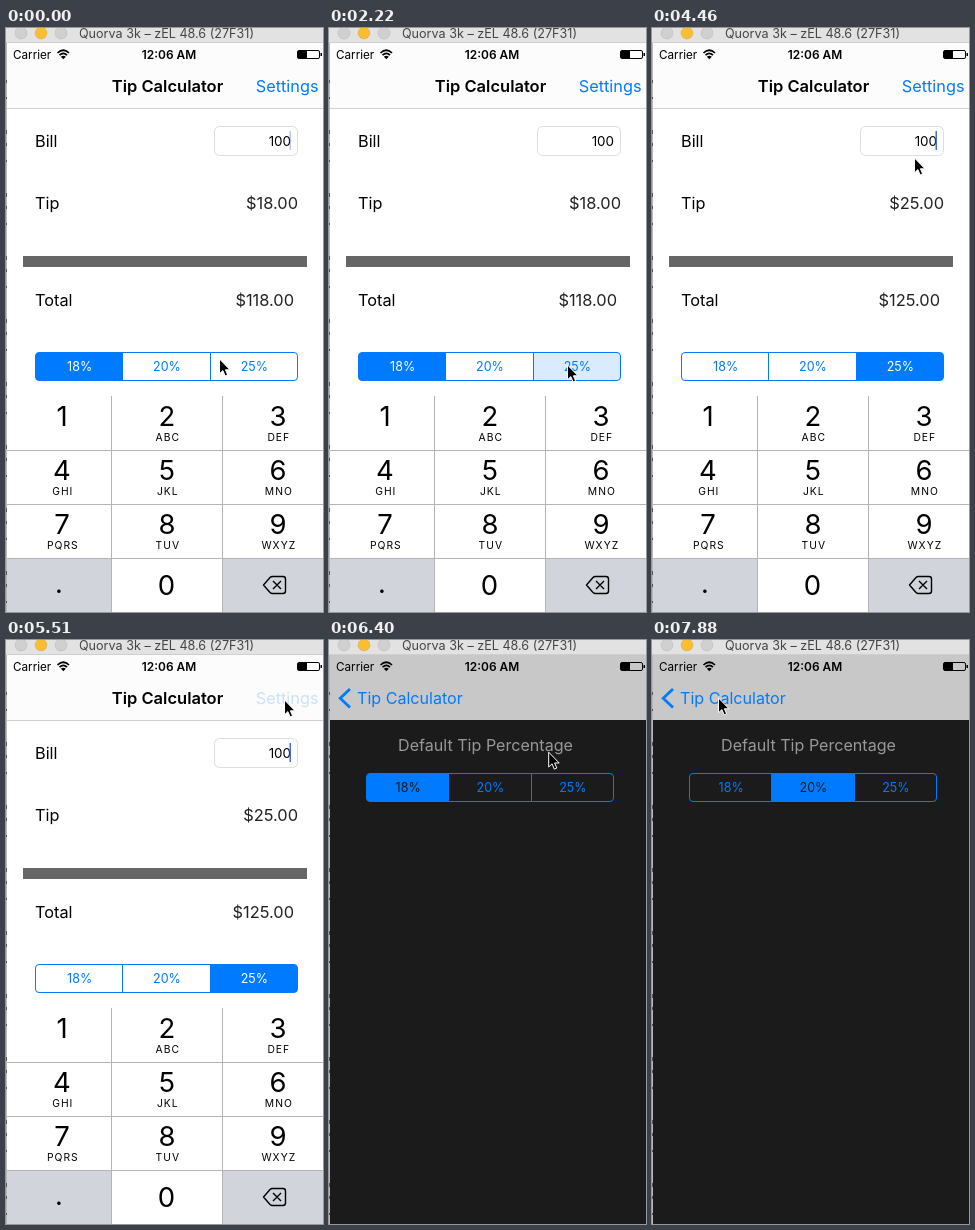
Animation of 317 by 584 pixels, one loop 8 s. Source, as an HTML page:

```html
<!DOCTYPE html>
<html lang="en">
<head>
<meta charset="utf-8">
<title>Tip calculator</title>
<style>
  html, body { margin: 0; width: 100%; height: 100%; overflow: hidden; background: #fff; }
  svg { display: block; width: 317px; height: 584px; font-family: Inter, Roboto, sans-serif; }
</style>
</head>
<body>
<svg id="stage" viewBox="0 0 317 584"></svg>
<script>
const LOOP = 8000, TICK = 148.75;
const BLUE = '#007aff', DARK = '#1b1b1b';
const stage = document.getElementById('stage');

// Pointer positions: tick, x, y
const POINTER = [
  [0, 213, 331], [2, 225, 330], [5, 304, 322], [8, 262, 334], [10, 238, 337],
  [18, 238, 337], [20, 232, 262], [21, 226, 231], [26, 226, 231], [30, 262, 130],
  [32, 285, 72], [33, 277, 61], [34, 278, 60], [40, 278, 60], [45, 180, 147],
  [46, 177, 150], [48, 177, 150], [51, 86, 61], [52, 86, 61], [53, 66, 58]
];

const clamp = v => Math.max(0, Math.min(1, v));
const rect = (x, y, w, h, fill, extra = '') =>
  `<rect x="${x}" y="${y}" width="${w}" height="${h}" fill="${fill}" ${extra}/>`;
const line = (d, stroke, width = 1, extra = '') =>
  `<path d="${d}" fill="none" stroke="${stroke}" stroke-width="${width}" ${extra}/>`;
const text = (s, x, y, size, fill = '#000', anchor = 'start', extra = '') =>
  `<text x="${x}" y="${y}" font-size="${size}" fill="${fill}" text-anchor="${anchor}" ${extra}>${s}</text>`;
const shift = (x, content) => `<g transform="translate(${x} 0)">${content}</g>`;

function pointer(tick) {
  let i = POINTER.findIndex(p => p[0] > tick);
  if (i < 0) i = POINTER.length - 1;
  const [t0, x0, y0] = POINTER[i - 1], [t1, x1, y1] = POINTER[i];
  const p = clamp((tick - t0) / (t1 - t0));
  const x = x0 + (x1 - x0) * p, y = y0 + (y1 - y0) * p;
  return `<path transform="translate(${x} ${y})" fill="#000" stroke="#fff"
    d="M.5 0V14.8L3.9 11.6L6.1 16.9L8.6 15.8L6.4 10.8H11Z"/>`;
}

// levels: how far each segment is selected, pressed: index of the touched one
function segments(id, x, y, w, levels, pressed, selectedInk) {
  const cell = w / 3;
  const shape = `x="${x}" y="${y}" width="${w}" height="28" rx="3.5"`;
  let out = `<clipPath id="${id}"><rect ${shape}/></clipPath><g clip-path="url(#${id})">`;
  levels.forEach((level, i) => {
    const alpha = i === pressed ? 0.15 : level;
    out += rect(x + i * cell, y, cell, 28, BLUE, `opacity="${alpha}"`);
  });
  out += '</g>';
  levels.forEach((level, i) => {
    const label = (ink, alpha) => text(['18%', '20%', '25%'][i], x + (i + .5) * cell + .5,
      y + 18.6, 12.5, ink, 'middle', `opacity="${alpha}"`);
    out += label(BLUE, 1 - level) + label(selectedInk, level);
  });
  const left = Math.floor(x + cell) + .5, right = Math.floor(x + 2 * cell) + .5;
  return out + line(`M${left} ${y}v28M${right} ${y}v28`, BLUE) +
    `<rect ${shape} fill="none" stroke="${BLUE}"/>`;
}

function keypad() {
  const letters = ['', 'ABC', 'DEF', 'GHI', 'JKL', 'MNO', 'PQRS', 'TUV', 'WXYZ'];
  const columns = [56, 161, 272];
  let out = rect(1, 368, 316, 216, '#fff') +
    rect(1, 530, 104, 54, '#d1d4db') + rect(217, 530, 100, 54, '#d1d4db');
  letters.forEach((s, i) => {
    const x = columns[i % 3], y = 398 + 54 * Math.floor(i / 3);
    out += text(i + 1, x, y, 27.5, '#000', 'middle') +
      text(s, x + .8, y + 15, 10.3, '#000', 'middle', 'letter-spacing="1"');
  });
  return out + text('0', 160.5, 567, 27.5, '#000', 'middle') +
    text('.', 53, 565, 27, '#000', 'middle') +
    line('M1 422.5H317M1 476.5H317M1 530.5H317M105.5 368V584M216.5 368V584', '#b3b4b8') +
    line('M257.5 557L264 549.5Q265 548.5 266.5 548.5H277Q279.5 548.5 279.5 551V563Q279.5 565.5 277 565.5H266.5Q265 565.5 264 564.5ZM267 553l8 8m0-8l-8 8',
      '#000', 1.4, 'stroke-linejoin="round"');
}

function caretOpacity(time) {
  const p = time % 1000;
  if (p < 100) return clamp((60 - p) / 160);
  return p < 700 ? clamp((p - 270) / 190) : clamp((1060 - p) / 160);
}

function calculator(tick) {
  const updated = tick >= 21;
  const change = clamp((tick - 18) / 2);
  const pressed = tick >= 14 && tick <= 18 ? 2 : -1;
  return rect(1, 80, 316, 288, '#fff') +
    text('Bill', 29, 119, 16.3) +
    rect(208.5, 98.5, 83, 29, '#fff', 'rx="5" stroke="#dedede"') +
    text('100', 285, 118, 13.4, '#000', 'end') +
    rect(283.5, 103, 1.5, 19, '#416ee0', `opacity="${caretOpacity(tick * TICK)}"`) +
    text('Tip', 29, 181, 16.3) +
    text(updated ? '$25.00' : '$18.00', 292, 181, 16.4, '#222', 'end') +
    rect(17, 228, 284, 11, '#666') +
    text('Total', 29, 278, 16.3) +
    text(updated ? '$125.00' : '$118.00', 288, 278, 16.4, '#222', 'end') +
    segments('rate', 29.5, 324.5, 262, [1 - change, 0, change], pressed, '#fff');
}

function calculatorBar(tick) {
  return rect(1, 15, 316, 65, '#fcfcfc') + rect(1, 80, 316, 1, '#cfcfcf') +
    text('Tip Calculator', 161.5, 64, 16.5, '#000', 'middle', 'font-weight="600"') +
    text('Settings', 312.5, 64, 16.3, BLUE, 'end', `opacity="${tick >= 36 ? .2 : 1}"`);
}

function settings(tick) {
  const change = clamp((tick - 46) / 2);
  const pressed = tick >= 45 && tick <= 46 ? 1 : -1;
  return rect(1, 80, 316, 504, DARK) +
    text('Default Tip Percentage', 156.5, 110.5, 16.1, '#989898', 'middle') +
    segments('default', 37.5, 133.5, 247, [1 - change, change, 0], pressed, DARK);
}

function settingsBar() {
  return line('M21 49L11.2 58.2L21 67.4', BLUE, 2.8) +
    text('Tip Calculator', 28, 64, 16.1, BLUE);
}

function statusBar() {
  return text('Carrier', 7, 30.5, 11.7) +
    line('M51.5 25Q57.3 19.5 63 25M53.5 27.2Q57.3 23.6 61 27.2', '#000', 1.7) +
    '<path d="M54.8 28.8Q57.3 26.8 59.8 28.8L57.3 31.2Z"/>' +
    text('12:06 AM', 163, 30.5, 11.9, '#000', 'middle', 'font-weight="600"') +
    rect(291.5, 22.5, 22, 8, 'none', 'rx="1.5" stroke="#000"') +
    rect(292, 23, 9, 7, '#000') + rect(314.5, 25, 1.5, 3, '#000');
}

function windowBar() {
  const lights = ['#d0d0d0', '#fdbd33', '#d0d0d0'].map((c, i) =>
    `<circle cx="${15 + 20 * i}" cy="5" r="6" fill="${c}" stroke="#0002" stroke-width=".6"/>`);
  return rect(0, 0, 317, 15, '#e2e2e2') + rect(0, 14, 317, 1, '#cfcfcf') + lights.join('') +
    text('Quorva 3k – zEL 48.6 (27F31)', 160.5, 10, 12.6, '#444', 'middle');
}

function scene(tick) {
  let view;
  if (tick < 39) {
    view = calculator(tick) + calculatorBar(tick) + keypad();
  } else {
    const offset = tick === 39 ? 5 : 0;
    view = offset ? shift(-94, calculatorBar(tick) + calculator(tick)) +
      rect(1, 15, offset, 353, '#000', 'opacity=".3"') + shift(offset - 316, keypad()) +
      rect(1, 368, offset, 216, '#000', 'opacity=".1"') : '';
    view += shift(offset, rect(1, 15, 316, 65, '#c8c8c8') + settings(tick)) + settingsBar();
  }
  return view + statusBar() + windowBar() +
    rect(0, 15, 1, 569, '#b8b8b8') +
    line('M.5 52V584', '#555', 1, 'stroke-dasharray="3 14 2 31 4 9"') + pointer(tick);
}

let start, shown = -1;
function frame(now) {
  start ??= now;
  const tick = Math.min(53, Math.floor(((now - start) % LOOP + 6) / TICK));
  if (tick !== shown) stage.innerHTML = scene(shown = tick);
  requestAnimationFrame(frame);
}
stage.innerHTML = scene(0);
requestAnimationFrame(frame);
</script>
</body>
</html>
```
